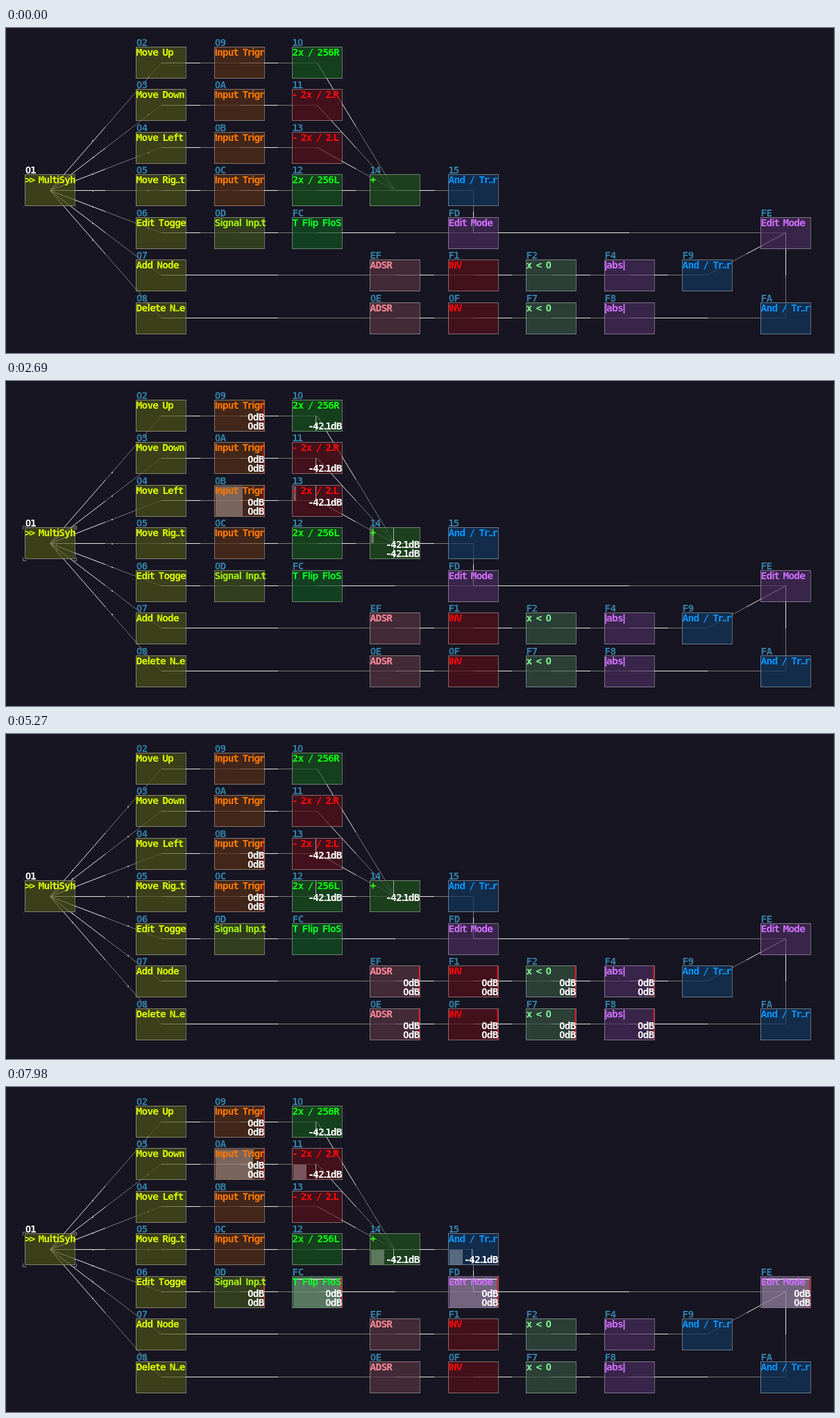
An HTML page with a canvas that plays this animation: 1193 by 469 pixels, repeating every 8 s.

```html
<!DOCTYPE html>
<html lang="en">
<head>
<meta charset="utf-8">
<title>Signal graph</title>
<style>
  html, body { margin: 0; width: 100%; height: 100%; overflow: hidden; background: #161521; }
  canvas { display: block; }
</style>
</head>
<body>
<canvas id="stage" width="1193" height="469"></canvas>
<script>
const g = document.getElementById('stage').getContext('2d');
const LOOP = 8000, W = 72, H = 46, FALL = 0.13; // FALL: meter decay, px per ms
const BG = '#161521';
const LIME = '#d8f800', ORANGE = '#ff7800', GREEN = '#10f810', RED = '#ff0808',
      BLUE = '#0894ff', PURPLE = '#d070ff', PINK = '#ff8898', MINT = '#84f898';

// Times at which each control is held: [press, release]
const held = {
  up: [[1290, 4500], [7300, LOOP]],
  down: [[1905, 4800], [7865, LOOP]],
  left: [[2460, 5500]],
  right: [[3050, 5700]],
  add: [[3942, 6850]],
  del: [[4120, 4650], [4650, 7050]],
  edit: [[6000, LOOP]]
};

const nodes = {};
function node(id, col, row, color, text, signal = {}) {
  const x = col ? Math.floor(187.6 + 112.43 * (col - 1)) : 27;
  const y = Math.floor(27.55 + 61.41 * row);
  const cy = Math.floor(50.2 + 61.34 * row) + 0.5;
  nodes[id] = { id, x, y, color, text, cx: x + 36.5, cy, scan: 4, delay: 0, ...signal };
}

node('01', 0, 3, LIME, '>> MultiSyh');
['Move Up', 'Move Down', 'Move Left', 'Move Rig..t', 'Edit Togge', 'Add Node', 'Delete N..e']
  .forEach((text, i) => node('0' + (i + 2), 1, i, LIME, text));
['up', 'down', 'left', 'right'].forEach((key, i) =>
  node('0' + '9ABC'[i], 2, i, ORANGE, 'Input Trigr', { both: [key] }));
node('0D', 2, 4, '#a4f010', 'Signal Inp.t', { both: ['edit'] });
node('10', 3, 0, GREEN, '2x / 256R', { R: ['up'] });
node('11', 3, 1, RED, '- 2x / 2.R', { R: ['down'] });
node('13', 3, 2, RED, '- 2x / 2.L', { L: ['left'] });
node('12', 3, 3, GREEN, '2x / 256L', { L: ['right'] });
node('14', 4, 3, '#38f818', '+', { L: ['left', 'right'], R: ['up', 'down'] });
node('15', 5, 3, BLUE, 'And / Tr..r', { R: ['up', 'down'], gate: 'edit' });
node('FC', 3, 4, '#08f828', 'T Flip FloS', { both: ['edit'], hold: true });
node('FD', 5, 4, PURPLE, 'Edit Mode', { both: ['edit'], hold: true });
node('FE', 9, 4, PURPLE, 'Edit Mode', { both: ['edit'], hold: true });
[['add', 5, 'EF F1 F2 F4'], ['del', 6, '0E 0F F7 F8']].forEach(([key, row, list]) => {
  const ids = list.split(' '), both = [key];
  node(ids[0], 4, row, PINK, 'ADSR', { both, scan: 16 });
  node(ids[1], 5, row, RED, 'INV', { both, scan: 30, delay: 8 });
  node(ids[2], 6, row, MINT, 'x < 0', { both, scan: 43, delay: 60 });
  node(ids[3], 7, row, PURPLE, '|abs|', { both, scan: 3, delay: 60 });
});
node('F9', 8, 5, BLUE, 'And / Tr..r');
node('FA', 9, 6, BLUE, 'And / Tr..r');

const links = [];
['02 09 10 14 15', '03 0A 11 14', '04 0B 13 14', '05 0C 12 14', '06 0D FC FD FE FA',
 '07 EF F1 F2 F4 F9', '08 0E 0F F7 F8 FA', 'FD 15', 'FE F9'].forEach(chain => {
  const ids = chain.split(' ');
  ids.slice(1).forEach((id, i) => links.push([nodes[ids[i]], nodes[id]]));
});
const root = nodes['01'];
const children = [2, 3, 4, 5, 6, 7, 8].map(n => nodes['0' + n]);
children.forEach(child => links.push([root, child]));

function rect(x, y, w, h, color) {
  g.fillStyle = color;
  g.fillRect(x, y, w, h);
}

function line(x1, y1, x2, y2, color) {
  g.strokeStyle = color;
  g.beginPath();
  g.moveTo(x1, y1);
  g.lineTo(x2, y2);
  g.stroke();
}

// Semi-proportional lettering: square cells, with slimmer ones for thin glyphs
const cells = { ' ': 6, i: 3.3, I: 3.3, l: 3.8, '.': 3, '|': 2.5, t: 6.8, r: 6, f: 7, '>': 6.5, '-': 6, 1: 7 };
const cell = ch => cells[ch] || 7.9;

function write(text, x, y, color) {
  g.fillStyle = color;
  for (const ch of text) {
    const family = 'iIl.|0'.includes(ch) ? '"Liberation Sans", sans-serif' : '"DejaVu Sans Mono", monospace';
    g.font = 'bold 14.5px ' + family;
    g.fillText(ch, x + cell(ch) / 2, y);
    x += cell(ch);
  }
}

function writeRight(text, x, y) {
  const width = [...text].reduce((sum, ch) => sum + cell(ch), 0);
  write(text, x - width, y, '#fff');
}

// Latest press among the keys that are down now, or -1
function pressed(keys, t) {
  let start = -1;
  for (const key of keys)
    for (const [a, b] of held[key])
      if (t >= a && t < b) start = Math.max(start, a);
  return start;
}

function drawSignal(n, t, keys, channel) {
  if (!keys || n.gate && pressed([n.gate], t) < 0) return;
  const start = pressed(keys, t);
  const age = t - start - n.delay;
  if (start < 0 || age < 0) return;
  const { x, y } = n, full = channel === 'both';
  const top = y + (channel === 'R' ? 24 : 2);
  const size = full ? H - 3 : 21;
  const width = (full ? 69 : 34) - (n.hold ? 0 : age * FALL);
  const fresh = n.hold || age < 100;
  if (width > 0) rect(x + 2, top, width, size, 'rgba(255,255,255,.29)');
  if (fresh) rect(x + 2, y + (full ? n.scan : 23), W - 3, 1, '#eee');
  if (full) rect(x + W - 1.5, y + 1, 1.5, H - 2, '#e80c10');
  else if (!fresh) rect(x + 34, top - 1, 1, size + 1, '#aaa');
}

function drawLevels(n, t) {
  if (n.gate && pressed([n.gate], t) < 0) return;
  const on = keys => keys && pressed(keys, t - n.delay) >= 0;
  const label = n.both ? '0dB' : '-42.1dB';
  if (on(n.both || n.L)) writeRight(label, n.x + W, n.y + 30);
  if (on(n.both || n.R)) writeRight(label, n.x + W, n.y + 43);
}

function drawNode(n, t) {
  const { x, y } = n;
  g.globalAlpha = 0.6;
  rect(x, y, W, H, BG);
  g.globalAlpha = 0.19;
  rect(x, y, W, H, n.color);
  g.globalAlpha = 1;
  g.strokeStyle = 'rgba(255,255,255,.36)';
  g.strokeRect(x + 0.5, y + 0.5, W, H - 1);
  for (const channel of ['both', 'L', 'R']) drawSignal(n, t, n[channel], channel);
  write(n.id, x + 1, y - 1, n === root ? '#fff' : '#3480a8');
  write(n.text, x + 1, y + 13, n.color);
  drawLevels(n, t);
}

function drawCursor(t) {
  const on = Math.floor((t + 225) / 900) % 2 === 1;
  const color = on ? '#858585' : '#34343c', arm = on ? 5 : 2;
  for (const [x, dx] of [[24.5, 1], [101.5, -1]])
    for (const [y, dy] of [[209.5, 1], [259.5, -1]]) {
      line(x, y, x + arm * dx, y, color);
      line(x, y, x, y + arm * dy, color);
    }
}

function draw(t) {
  rect(0, 0, 1193, 469, BG);
  g.lineWidth = 1;
  g.textAlign = 'center';
  for (const [a, b] of links) {
    const mx = (a.cx + b.cx) / 2, my = (a.cy + b.cy) / 2;
    line(a.cx, a.cy, mx, my, '#e4e4e4');
    line(mx, my, b.cx, b.cy, '#777');
  }
  for (const child of children)
    for (const shift of [0, 0.5]) {
      const p = (0.386 + t / 4000 + shift) % 1;
      rect(Math.round(root.cx + (child.cx - root.cx) * p) - 1,
           Math.round(root.cy + (child.cy - root.cy) * p) - 1, 2, 2, '#b0b0b0');
    }
  Object.values(nodes).forEach(n => drawNode(n, t));
  drawCursor(t);
}

const begin = performance.now();
function frame() {
  draw((performance.now() - begin) % LOOP);
  requestAnimationFrame(frame);
}
frame();
</script>
</body>
</html>
```
